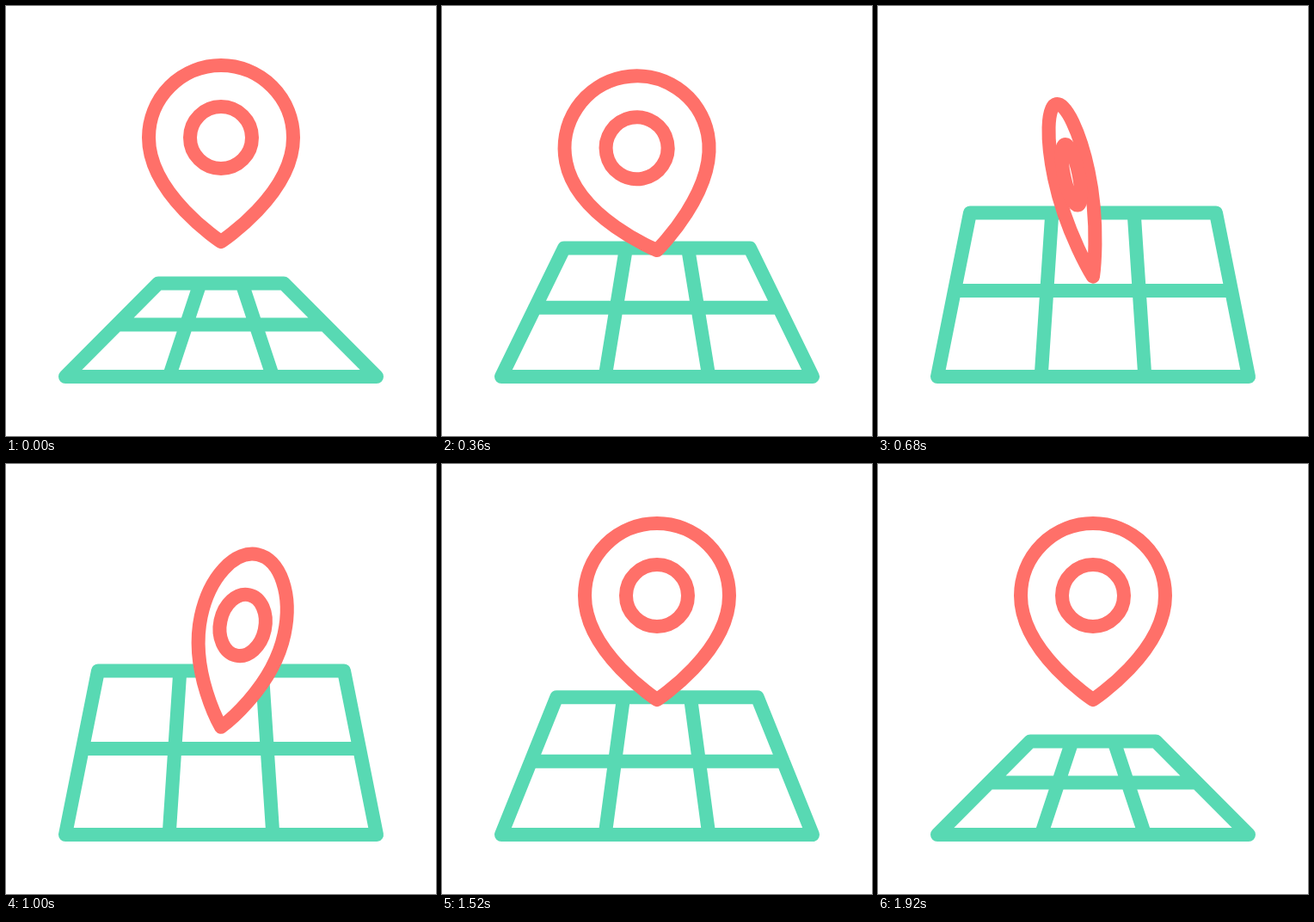
Write an HTML page with a canvas that moves like this. It is 500x500 px and loops after 2000 ms.

```html
<!DOCTYPE html>
<html lang="en">
<head>
<meta charset="utf-8">
<title>Map pin</title>
<style>
html, body { margin: 0; width: 100%; height: 100%; overflow: hidden; background: #fff; }
canvas { display: block; width: 100vmin; height: 100vmin; }
</style>
</head>
<body>
<canvas id="stage" width="500" height="500"></canvas>
<script>
const ctx = document.getElementById('stage').getContext('2d');
const LOOP = 2000, STEP = 40;
const CORAL = '#ff7069', GREEN = '#58d9b3';

const mix = (a, b, p) => a + (b - a) * p;

// Sine ease in and out between two times
function ease(t, start, end) {
  const x = Math.min(1, Math.max(0, (t - start) / (end - start)));
  return (1 - Math.cos(Math.PI * x)) / 2;
}

function drawMap(t) {
  const open = ease(t, 85, 635) - ease(t, 1245, 1900);
  const top = mix(322.5, 240.5, open), mid = mix(370.5, 331, open), bottom = 431;
  const topHalf = mix(73, 143, open), bottomHalf = 181;
  const midHalf = mix(topHalf, bottomHalf, (mid - top) / (bottom - top));

  ctx.beginPath();
  ctx.moveTo(250 - topHalf, top);
  ctx.lineTo(250 + topHalf, top);
  ctx.lineTo(250 + bottomHalf, bottom);
  ctx.lineTo(250 - bottomHalf, bottom);
  ctx.closePath();
  ctx.moveTo(250 - midHalf, mid);
  ctx.lineTo(250 + midHalf, mid);
  for (const side of [-1 / 3, 1 / 3]) {
    ctx.moveTo(250 + side * topHalf, top);
    ctx.lineTo(250 + side * bottomHalf, bottom);
  }
  ctx.strokeStyle = GREEN;
  ctx.stroke();
}

// Builds a path in pin space (tip at 0,0) but keeps the line width even
function pinPath(y, tilt, width, build) {
  ctx.save();
  ctx.translate(250, y);
  ctx.rotate(tilt * Math.PI / 180);
  ctx.scale(Math.max(width, 0.001), 1);
  ctx.beginPath();
  build();
  ctx.restore();
}

function body() {
  ctx.moveTo(0, 0);
  ctx.bezierCurveTo(0, 0, -84, -55, -84, -121);
  ctx.arc(0, -121, 84, Math.PI, 0);
  ctx.bezierCurveTo(84, -55, 0, 0, 0, 0);
  ctx.closePath();
}

function ring() {
  ctx.arc(0, -121, 36, 0, Math.PI * 2);
  ctx.closePath();
}

function drawPin(t) {
  const y = 274 + 43 * (ease(t, 167, 770) - ease(t, 785, 1415));
  const tilt = 12 * (2 * ease(t, 680, 1000) - ease(t, 167, 400) - ease(t, 1000, 1420));
  const turn = 1 - ease(t, 500, 767);

  ctx.strokeStyle = CORAL;
  ctx.fillStyle = '#fff';
  pinPath(y, tilt, turn + ease(t, 767, 1185), body);
  ctx.fill();
  ctx.stroke();
  pinPath(y, tilt, turn + ease(t, 767, 1125), ring);
  ctx.stroke();
}

function draw(t) {
  ctx.fillStyle = '#fff';
  ctx.fillRect(0, 0, 500, 500);
  ctx.lineWidth = 16;
  ctx.lineCap = ctx.lineJoin = 'round';
  drawMap(t);
  drawPin(t);
}

const begin = performance.now();
function tick() {
  const t = Math.max(0, performance.now() - begin) % LOOP;
  draw(Math.floor(t / STEP) * STEP);
  requestAnimationFrame(tick);
}
tick();
</script>
</body>
</html>
```
